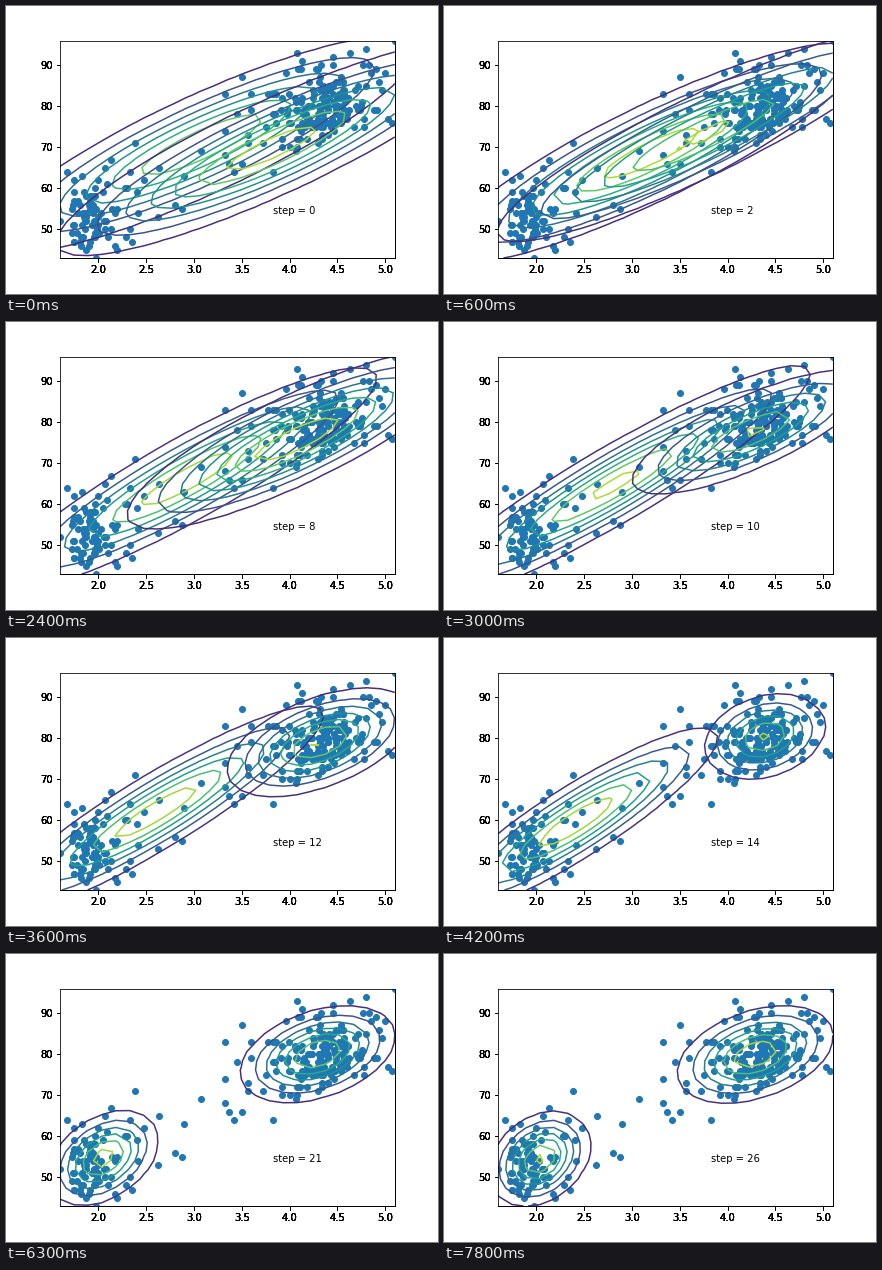
A matplotlib script that plays this animation: 432x288 px, repeating every 8 s.

```python
import numpy as np
import matplotlib.pyplot as plt
from matplotlib.animation import FuncAnimation
from matplotlib.ticker import MaxNLocator

plt.rcParams["font.family"] = "DejaVu Sans"
X_LIM, Y_LIM = (1.6, 5.1), (43, 96)
TICKS_X, TICKS_Y = np.arange(2, 5.1, 0.5), np.arange(50, 91, 10)
FRAME_MS, FRAMES, FRAMES_PER_STEP = 100, 80, 3

# Mean x, mean y, spread x, spread y and correlation at some fitting steps.
STEPS = [0, 2, 6, 10, 14, 18, 20, 23, 26]
LEFT = np.array([
    (3.08, 70.6, 1.14, 13.4, 0.87),
    (3.20, 68.6, 1.08, 13.2, 0.88),
    (3.05, 67.6, 1.00, 13.2, 0.885),
    (2.81, 64.7, 1.03, 14.6, 0.933),
    (2.415, 59.6, 0.755, 11.7, 0.90),
    (2.11, 55.5, 0.37, 6.4, 0.61),
    (2.06, 54.8, 0.31, 6.0, 0.43),
    (2.036, 54.48, 0.263, 5.805, 0.285),
    (2.036, 54.48, 0.263, 5.805, 0.285),
])
RIGHT = np.array([
    (3.82, 69.8, 1.12, 13.0, 0.88),
    (3.75, 73.0, 1.13, 13.6, 0.91),
    (3.90, 74.1, 1.09, 13.6, 0.91),
    (4.245, 77.6, 0.65, 7.9, 0.78),
    (4.39, 80.4, 0.327, 5.4, 0.25),
    (4.31, 80.28, 0.393, 5.73, 0.39),
    (4.295, 80.05, 0.405, 5.9, 0.38),
    (4.29, 79.97, 0.4125, 6.004, 0.38),
    (4.29, 79.97, 0.4125, 6.004, 0.38),
])

SPARSE = [
    (2.88, 55), (2.8, 56), (2.62, 53), (2.9, 63), (3.07, 69), (2.63, 65),
    (2.38, 71), (3.32, 83), (3.33, 74), (3.33, 68), (3.37, 66), (3.42, 64),
    (3.5, 66), (3.5, 87), (3.45, 78), (3.57, 71), (3.57, 73), (3.6, 83),
    (3.6, 79), (3.83, 64), (3.75, 75), (3.77, 83), (3.72, 71), (3.85, 78),
    (3.92, 70), (4.0, 70), (4.07, 69), (4.08, 70), (4.08, 93), (4.13, 91),
    (4.3, 89), (4.33, 90), (4.45, 90), (4.63, 93), (4.45, 92), (4.8, 94),
    (4.77, 90), (5.1, 96), (5.03, 77), (5.07, 76), (5.0, 88), (4.93, 86),
    (4.9, 89), (1.67, 64), (2.07, 65), (2.13, 67), (1.6, 52), (1.75, 62),
    (1.75, 59), (1.75, 47), (1.98, 43), (2.2, 45), (2.17, 46), (2.35, 47),
    (1.82, 46), (1.87, 45), (1.9, 46), (2.33, 64), (2.3, 60), (2.42, 54),
    (2.48, 62), (2.4, 59), (1.83, 63), (2.0, 62), (2.28, 60), (2.33, 50),
]


def cluster(rng, count, center, spread, corr, low, high):
    """Correlated points inside a box, with whole-number heights."""
    u, v = rng.standard_normal((2, 6 * count))
    x = center[0] + spread[0] * u
    y = np.round(center[1] + spread[1] * (corr * u + np.sqrt(1 - corr**2) * v))
    keep = (x > low[0]) & (x < high[0]) & (y >= low[1]) & (y <= high[1])
    return np.column_stack([x, y])[keep][:count]


def density(x, y, params):
    mx, my, sx, sy, corr = params
    u, v = (x - mx) / sx, (y - my) / sy
    rest = 1 - corr**2
    peak = 1 / (2 * np.pi * sx * sy * np.sqrt(rest))
    return peak * np.exp(-(u * u - 2 * corr * u * v + v * v) / (2 * rest)), peak


def params_at(table, step):
    return [np.interp(step, STEPS, column) for column in table.T]


def style(axes):
    axes.set(xlim=X_LIM, ylim=Y_LIM, xticks=TICKS_X, yticks=TICKS_Y)


fig = plt.figure(figsize=(6, 4), dpi=72, facecolor="white")
box = [0.125, 0.125, 0.775, 0.755]

# Stacked copies give the tick labels their heavy look.
for _ in range(4):
    copy = fig.add_axes(box, facecolor="none")
    style(copy)
ax = fig.add_axes(box)

rng = np.random.default_rng(7)
points = np.vstack([
    SPARSE,
    cluster(rng, 62, (1.95, 53.5), (0.17, 4.5), 0.2, (1.7, 47), (2.4, 62)),
    cluster(rng, 144, (4.37, 79.8), (0.26, 4.7), 0.25, (3.8, 71), (4.98, 90)),
])
ax.scatter(points[:, 0], points[:, 1], s=36, color="#1f77b4", zorder=1)
style(ax)
label = ax.text(3.825, 53.7, "", fontsize=10)

grid_x, grid_y = np.meshgrid(np.linspace(*X_LIM, 25), np.linspace(*Y_LIM, 25))
locator = MaxNLocator(8, min_n_ticks=1)
contours = []


def draw(frame):
    step = frame // FRAMES_PER_STEP
    while contours:
        contours.pop().remove()
    for table in (LEFT, RIGHT):
        z, peak = density(grid_x, grid_y, params_at(table, step))
        levels = locator.tick_values(0, peak)
        contours.append(ax.contour(grid_x, grid_y, z, levels=levels,
                                   cmap="viridis", linewidths=1.5))
    style(ax)
    label.set_text(f"step = {step}")
    return []


anim = FuncAnimation(fig, draw, frames=FRAMES, interval=FRAME_MS,
                     init_func=lambda: [], repeat=True, repeat_delay=0,
                     blit=False)
plt.show()
```
